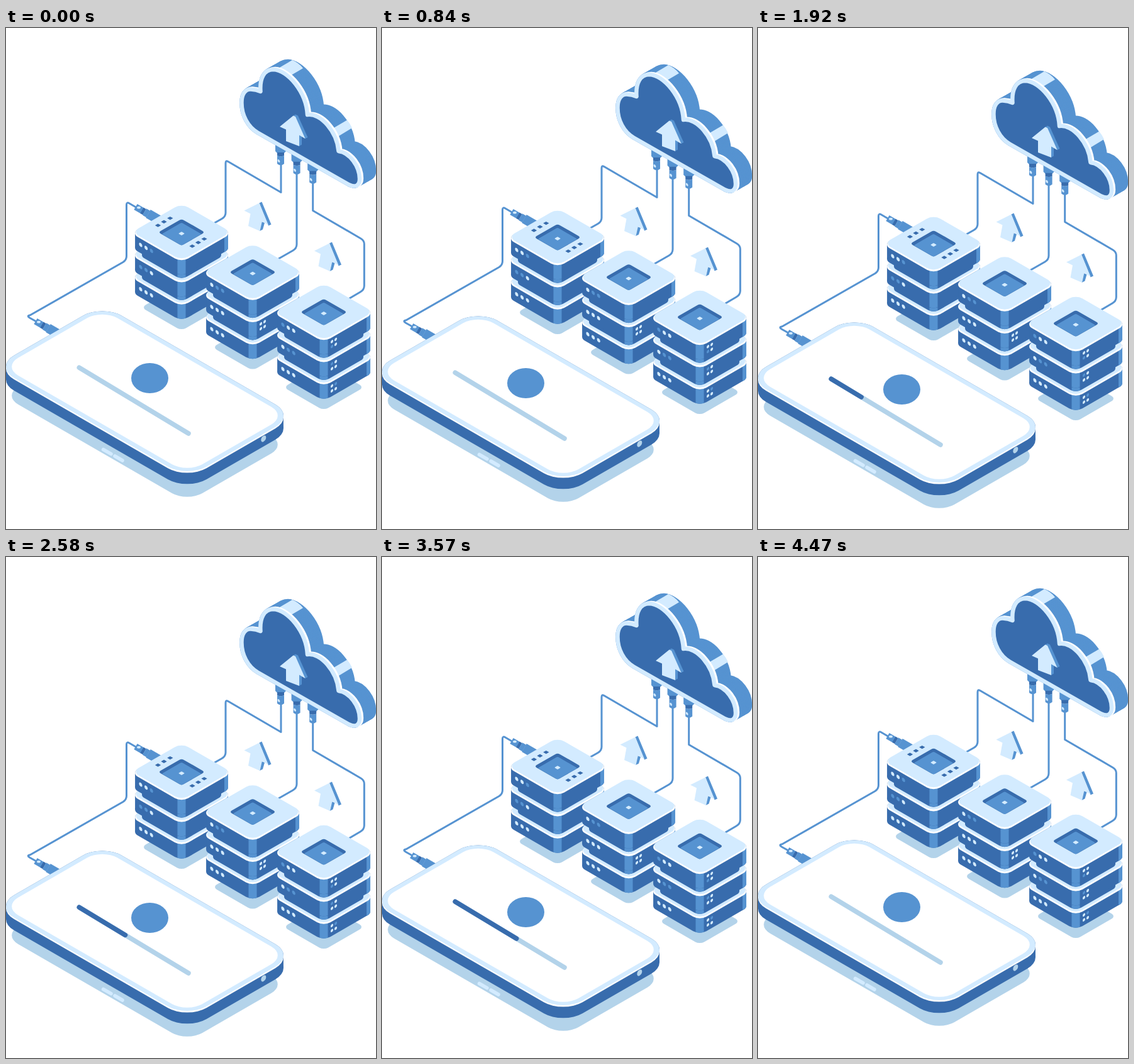
An HTML page that plays this animation: 588x797 px, repeating every 4500 ms.

```html
<!DOCTYPE html>
<html lang="en">
<head>
<meta charset="utf-8">
<title>Cloud upload</title>
<style>
  html, body { margin: 0; width: 100%; height: 100%; overflow: hidden; background: #fff; }
  svg { display: block; width: 588px; height: 797px; }
  #scene { animation: drift 4.5s infinite; }
  #fill { stroke-dasharray: 100 200; animation: load 4.5s linear infinite; }
  @keyframes drift {
    0% { transform: translateY(0); }
    1.29% { transform: translateY(0); animation-timing-function: steps(20, jump-start); }
    49.73% { transform: translateY(20px); }
    51.33% { transform: translateY(20px); animation-timing-function: steps(20, jump-start); }
    100% { transform: translateY(0); }
  }
  @keyframes load {
    0%, 22.2% { opacity: 0; stroke-dashoffset: 100; }
    22.21% { opacity: 1; stroke-dashoffset: 100; animation-timing-function: cubic-bezier(.5, 1, .89, 1); }
    99.3% { opacity: 1; stroke-dashoffset: 40; }
    99.31%, 100% { opacity: 0; stroke-dashoffset: 40; }
  }
</style>
</head>
<body>
<svg viewBox="0 0 588 797"><g id="scene"></g></svg>
<script>
const DARK = '#386cad', MID = '#5693d1', LIGHT = '#d3ebff', SHADE = '#b3d3ea', WHITE = '#fff';
const COS = 0.866;

const path = (d, fill) => `<path d="${d}" fill="${fill}"/>`;
const line = (d, color, width, cap = 'butt') =>
  `<path d="${d}" fill="none" stroke="${color}" stroke-width="${width}" stroke-linecap="${cap}" stroke-linejoin="round"/>`;

// Rounded rectangle lying on the isometric floor, (x, y) is its back corner.
const floor = (x, y, a, b, r, fill) =>
  `<rect width="${a}" height="${b}" rx="${r}" fill="${fill}" transform="matrix(${COS} .5 -${COS} .5 ${x} ${y})"/>`;

const block = (x, y, a, b, r, h, fill) => {
  const left = x - COS * b + 0.507 * r, right = x + COS * a - 0.507 * r;
  const yl = y + b / 2, yr = y + a / 2;
  return floor(x, y, a, b, r, fill) + floor(x, y + h, a, b, r, fill) +
    path(`M${left} ${yl}L${right} ${yr}v${h}L${left} ${yl + h}z`, fill);
};

// Centred square versions, w is half the width on screen.
const tile = (cx, cy, w, r, fill) => floor(cx, cy - w * 0.5774, w / COS, w / COS, r, fill);
const box = (cx, cy, w, r, h, fill) => block(cx, cy - w * 0.5774, w / COS, w / COS, r, h, fill);

const dot = (x, y, r, color, tilt = 0.5) =>
  `<circle r="${r}" fill="${color}" transform="matrix(${COS} ${tilt} 0 1 ${x} ${y})"/>`;

const edge = (cx, bottom, h) =>
  path(`M${cx - 6.5} ${bottom - h}V${bottom - 1.4}Q${cx} ${bottom + 1.4} ${cx + 6.5} ${bottom - 1.4}V${bottom - h}z`, MID);

const tone = c => c === '1' ? LIGHT : MID;

function slab(cx, cy, leds, ports) {
  const y = cy + 2, h = 23;
  let s = box(cx, y, 80, 12, h, DARK) + edge(cx, y + h + 42.7, 27);
  s += path(`M${cx + 68} ${y}V${y + h + 6.9}Q${cx + 74} ${y + h + 4} ${cx + 74} ${y + h}V${y}z`, MID);
  s += tile(cx, y, 80, 12, WHITE) + tile(cx, cy, 78.5, 12, LIGHT);
  [...leds].forEach((c, i) => s += dot(cx - 65 + i * 8.6, cy + 20.5 + i * 4.8, 3, tone(c)));
  [...ports].forEach((c, i) =>
    s += dot(cx + 13 + i % 2 * 6, cy + 47.3 - i % 2 * 3.5 + (i >> 1) * 7.8, 2.4, tone(c), -0.5));
  return s;
}

function server(cx, cy, leds, ports) {
  const gap = 35.3;
  let s = tile(cx, cy + 120, 64, 8, SHADE);
  for (let i = 2; i >= 0; i--) {
    const y = cy + i * gap;
    s += slab(cx, y, leds[i], ports[i]);
    if (i) s += box(cx, y - 14, 68, 10, 15.5, DARK) + edge(cx, y + 37.8, 15);
  }
  return s + tile(cx, cy + 0.5, 37, 4, DARK) + tile(cx, cy + 3.3, 31.5, 2, MID) + tile(cx, cy + 2.5, 5, 1, LIGHT);
}

function cloudPlug(i) {
  const x = 436.5 + i * 25.6, y = 188 + i * 14.8;
  return path(`M${x - 8.5} ${y - 5}h17V${y + 8}L${x + 5.5} ${y + 11}h-11L${x - 8.5} ${y + 8}z`, MID) +
    path(`M${x - 5.5} ${y + 10}h11v5q-5.5 2.5 -11 0z`, DARK) +
    path(`M${x - 5.5} ${y + 15}q5.5 2.5 11 0v13q-5.5 4.5 -11 0z`, MID) + dot(x - 3, y + 23.5, 2.2, LIGHT);
}

const cablePlug = (x, y) =>
  line(`M${x} ${y}l12 7`, MID, 10.5) + line(`M${x + 10} ${y + 5.8}l4 2.3`, DARK, 10.5) +
  line(`M${x + 20} ${y + 11}L${x + 42} ${y + 23.7}`, MID, 15) +
  line(`M${x + 14} ${y + 8}L${x + 20} ${y + 11.5}`, MID, 12) +
  `<ellipse cx="${x + 5}" cy="${y + 1.2}" rx="2.9" ry="1.9" fill="${LIGHT}"/>`;

const floatArrow = (dx, dy) => `<g transform="translate(${dx} ${dy})">` +
  path('M402.500 278.500L406.500 276.500L421.500 312.500L417 314.500z', MID) +
  path('M406 308L411 310L408 320.500L403 323z', MID) +
  path('M402.500 278.500L378.500 290.500L388.500 295.500L385 315L403.500 323L407 307.500L417 313.500z', LIGHT) + '</g>';

function cloud() {
  const d = 'M374.500 120C374 106 380 97 389 97.500C396 98 401 99.500 404.500 101' +
    'C403 80 410 66 425 66C448 67 477 102 479 138C500 135 526 165 528.500 196' +
    'C546 198 562 220 562 240C562 251 555 254 545 249.300L400 166.500C384 157 374.500 138 374.500 120z';
  const copy = (x, y, fill, stroke) =>
    `<path d="${d}" fill="${fill}" stroke="${stroke}" stroke-width="6.5" stroke-linejoin="round" transform="translate(${x} ${y})"/>`;
  let s = '';
  for (let i = 24; i >= 0; i--) s += copy(23 * i / 24, -13 * i / 24, MID, MID);
  s += path('M433 64L455 51Q465 55 472 64L450 77z', LIGHT) + path('M519 160L542 146.500Q547 152 550 159L527 173z', LIGHT);
  return s + copy(2.9, -1, WHITE, WHITE) + copy(0, 0, DARK, LIGHT) +
    path('M456.500 139.500L460 137.500L464 139.500L479.500 174L475.500 176L470 173V185.500L466 188L462 170z', MID) +
    path('M456.500 139.500L435 157L445 161.500V180L466 188V170.500L475.500 176L460 141z', LIGHT);
}

function phone() {
  const x = 153, y = 440, a = 353.3, b = 197.5, r = 35.5, inset = 7.5;
  const inner = dy => [x, y + inset + dy, a - 2 * inset, b - 2 * inset, r - inset];
  const bar = 'M116.300 540.300L290 645';
  return floor(...inner(46), SHADE) +
    line('M154.500 670.500L167 677.700', LIGHT, 5.5, 'round') + line('M173 681L185 688', LIGHT, 5.5, 'round') +
    block(x, y, a, b, r, 20.3, DARK) + floor(x, y + 2.6, a, b, r, WHITE) +
    floor(x, y, a, b, r, LIGHT) + floor(...inner(0), WHITE) +
    dot(409.3, 653.3, 4.6, SHADE, -0.5) +
    `<ellipse cx="228.500" cy="557" rx="29.500" ry="24" fill="${MID}"/>` +
    line(bar, SHADE, 7.5, 'round') +
    `<path id="fill" d="${bar}" pathLength="100" fill="none" stroke="${DARK}" stroke-width="7.500" stroke-linecap="round"/>`;
}

const wires = [
  'M50 468L37.500 461Q32.500 458 38.500 456.800L186 372.500Q191.500 369 191.500 363V281Q191.500 276.500 196 279L208 286',
  'M328 312L343 303.500Q349 300 349 294V215Q349 210 353 212.500L437 261.500V214',
  'M428 370L456 354Q462 350.500 462 344V228',
  'M541 433L563 420Q569.300 416.500 569.300 410V344Q569.300 338 564 335L487.700 290.500V243'
];

const pads = [[241.5, 314], [251, 308.3], [260.8, 302.6], [296, 352], [305.5, 346.3], [315, 340.6]]
  .map(([x, y], i) => [x, i > 2 ? y - 5 : y]);

document.getElementById('scene').innerHTML =
  wires.map(d => line(d, MID, 3)).join('') +
  [0, 1, 2].map(cloudPlug).join('') + cloud() +
  cablePlug(47, 466.5) + cablePlug(206, 284.5) +
  server(279, 324.5, ['110', '001', '111'], ['', '', '']) +
  pads.map(([x, y]) => tile(x, y, 4.7, 0.5, DARK)).join('') +
  server(392, 388, ['100', '111', '111'], ['', '1111', '']) +
  server(505, 451.5, ['011', '100', '111'], ['1101', '0111', '1011']) +
  floatArrow(0, 0) + floatArrow(111.5, 64) + phone();
</script>
</body>
</html>
```
